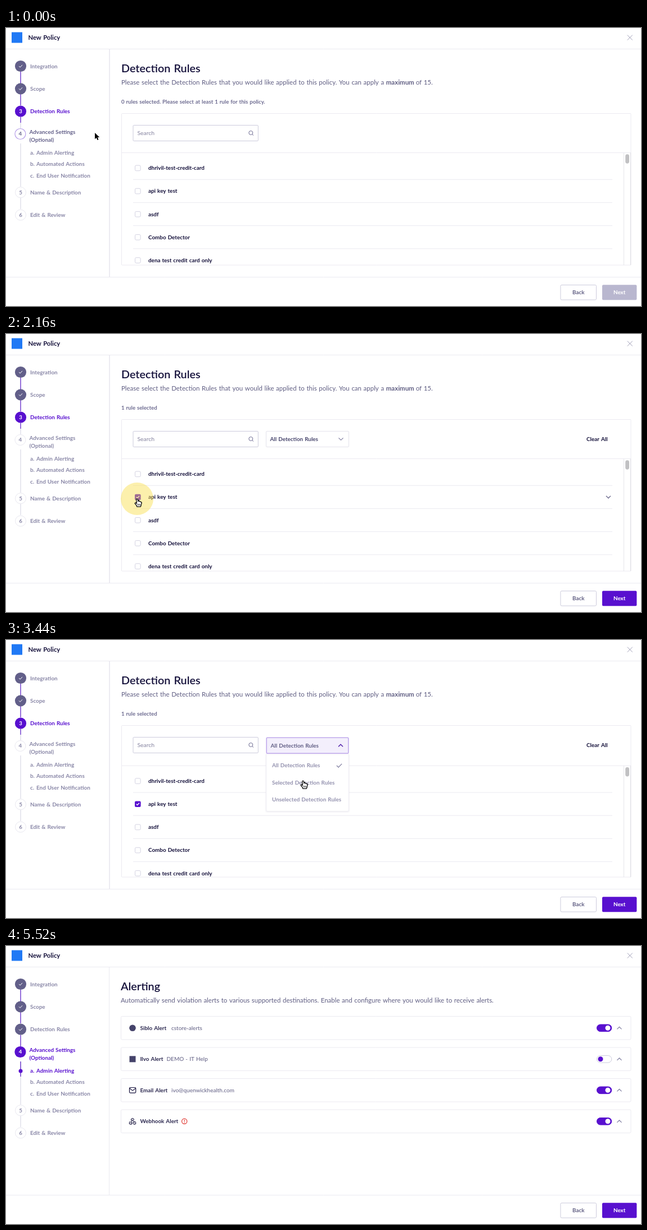
These frames come from a looping animation (1129x496 px, 5.68 s). An HTML page with a canvas:

```html
<!DOCTYPE html>
<html lang="en">
<head>
<meta charset="utf-8">
<title>New Policy</title>
<style>
html, body { margin: 0; width: 100%; height: 100%; overflow: hidden; background: #fff; }
canvas { display: block; width: 1129px; height: 496px; }
</style>
</head>
<body>
<canvas id="stage"></canvas>
<script>
const W = 1129, H = 496, LOOP = 5680, STEP = 80;
const canvas = document.getElementById('stage');
const ctx = canvas.getContext('2d');
const dpr = window.devicePixelRatio || 1;
canvas.width = W * dpr;
canvas.height = H * dpr;

const INK = '#15113b', DARK = '#48466d', MID = '#5f5d82', SOFT = '#8987a7';
const LINE = '#ebeaf1', EDGE = '#cccbdc', PURPLE = '#5810cf';
const BODY = 11.48;

// When things happen, in ms
const SELECT = 2000, OPEN = 2880, FILTER = 3600, SUBMIT = 4960, PAGE = 5120, HIDE = 5280;
const CLICKS = [SELECT, OPEN, FILTER, SUBMIT];

// Pointer stops: time, x, y
const PATH = [
  [0, 158, 187], [1200, 271, 213], [1280, 271, 213], [1680, 233, 294],
  [2240, 233, 294], [2800, 524, 187], [3040, 524, 187], [3440, 528, 251],
  [3680, 528, 251], [4000, 243, 249], [4160, 243, 249], [4720, 1091, 481]
];

const RULES = ['dhrivil-test-credit-card', 'api key test', 'asdf', 'Combo Detector', 'dena test credit card only'];
const ROW = 41.15;

function text(str, x, y, color, size = 9.9, weight = 700, align = 'left') {
  ctx.font = `${weight} ${size}px Lato, sans-serif`;
  ctx.wordSpacing = `${size * 0.06}px`;
  ctx.textAlign = align;
  ctx.fillStyle = color;
  ctx.fillText(str, x, y + size * 0.355);
  return ctx.measureText(str).width;
}

function line(points, color, width = 1) {
  ctx.beginPath();
  points.forEach(([x, y]) => ctx.lineTo(x, y));
  ctx.strokeStyle = color;
  ctx.lineWidth = width;
  ctx.stroke();
}

const hline = (x1, x2, y, color = LINE) => line([[x1, y], [x2, y]], color);
const vline = (x, y1, y2, color = LINE, width = 1) => line([[x, y1], [x, y2]], color, width);

function box(x, y, w, h, fill, edge, radius = 1.5, width = 1) {
  ctx.beginPath();
  ctx.roundRect(x, y, w, h, radius);
  paint(fill, edge, width);
}

function disc(x, y, r, fill, edge, width = 1) {
  ctx.beginPath();
  ctx.arc(x, y, r, 0, Math.PI * 2);
  paint(fill, edge, width);
}

function paint(fill, edge, width) {
  if (fill) { ctx.fillStyle = fill; ctx.fill(); }
  if (edge) { ctx.strokeStyle = edge; ctx.lineWidth = width; ctx.stroke(); }
}

const check = (x, y, s, color, width = 1.2) =>
  line([[x - s, y], [x - s * 0.3, y + s * 0.7], [x + s, y - s * 0.7]], color, width);

const chevron = (x, y, up, color = '#77759a', width = 1.1) => {
  const d = up ? -2 : 2;
  line([[x - 4, y - d], [x, y + d], [x + 4, y - d]], color, width);
};

function pointerAt(t) {
  for (let i = 1; i < PATH.length; i++) {
    const [t0, x0, y0] = PATH[i - 1], [t1, x1, y1] = PATH[i];
    if (t <= t1) {
      const u = (t - t0) / (t1 - t0), e = u * u * (3 - 2 * u);
      return { x: x0 + (x1 - x0) * e, y: y0 + (y1 - y0) * e };
    }
  }
  const [, x, y] = PATH[PATH.length - 1];
  return { x, y };
}

const within = (p, x1, y1, x2, y2) => p.x >= x1 && p.x <= x2 && p.y >= y1 && p.y <= y2;

function drawFrame() {
  box(10, 7.5, 19, 19, '#2079f5', null, 0);
  text('New Policy', 39.5, 17, INK, 11.2);
  line([[1104.8, 12.6], [1113.8, 21.6]], '#a09fb8');
  line([[1113.8, 12.6], [1104.8, 21.6]], '#a09fb8');
  hline(0, W, 37.5);
  hline(0, W, 444.5);
}

function step(n, y, label, state) {
  const x = n === 4 ? 25.4 : 26;
  const hover = state === 'hover';
  if (state === 'done') {
    disc(x, y, 10.1, '#625f89');
    check(x, y, 3, '#fff', 1);
  } else if (state === 'active') {
    disc(x, y, 10.1, PURPLE);
    text(n, x, y, '#fff', 9.5, 700, 'center');
  } else {
    disc(x, y, 9.5, '#fff', hover ? '#b79fe9' : '#e9e8f0', hover ? 1.2 : 1);
    text(n, x, y, hover ? '#6b6990' : SOFT, 9.8, 700, 'center');
  }
  const color = state === 'active' ? PURPLE : hover ? '#64618a' : SOFT;
  if (n === 4) {
    text(label, 41.5, 185.7, color);
    text('(Optional)', 41.5, 199.2, color);
  } else {
    text(label, 43, y, color);
  }
}

function drawSidebar(alerting, hover) {
  const grey = '#dfdee8', violet = '#6a35cc';
  if (alerting) vline(183.5, 38, 444);
  else vline(184, 38, 444, '#ecebf2', 2);
  vline(26, 78, 138, violet, 1.4);
  vline(26, 159, alerting ? 179 : 169, violet, 1.4);
  if (!alerting) vline(26, 169, 179, grey, 1.4);
  vline(26, 206, 283, grey, 1.4);
  vline(26, 303, 323, grey, 1.4);
  step(1, 68, 'Integration', 'done');
  step(2, 108.3, 'Scope', 'done');
  step(3, 148.7, 'Detection Rules', alerting ? 'done' : 'active');
  step(4, 189, 'Advanced Settings', alerting ? 'active' : hover ? 'hover' : 'next');
  step(5, 293.3, 'Name & Description', 'next');
  step(6, 333.6, 'Edit & Review', 'next');
  if (alerting) {
    vline(26, 206, 233, violet, 1.4);
    disc(26, 223, 3.5, PURPLE);
  }
  ['Admin Alerting', 'Automated Actions', 'End User Notification'].forEach((name, i) => {
    const y = 222.7 + i * 20.2, color = alerting && i === 0 ? PURPLE : SOFT;
    text('abc'[i] + '.', 43, y, color);
    text(name, 54, y, color);
  });
}

function drawButtons(fill) {
  box(986, 458.5, 63.5, 26.5, '#fff', EDGE, 2);
  text('Back', 1017.7, 471.5, MID, 9.9, 700, 'center');
  box(1060, 458.3, 61.4, 26.9, fill, null, 2);
  text('Next', 1090.7, 471.5, '#fff', 9.9, 700, 'center');
}

function drawHeading(title, x) {
  text(title, x, 71.5, INK, 19.8, 600);
}

function drawRow(name, y, checked, hover) {
  if (checked) {
    box(229, y - 5.2, 10.6, 10.6, PURPLE, null, 2);
    check(234.3, y, 2.7, '#fff', 1.3);
  } else {
    box(229.5, y - 4.7, 9.6, 9.6, '#fff', '#d3d2e1', 2);
  }
  text(name, 253, y, INK);
  if (hover) chevron(1071, y, false, '#56547c', 1.2);
}

function drawDropdown(open, label) {
  if (!open) {
    box(462.5, 173.5, 147, 28, '#fff', '#e4e3ec');
    text(label, 469.5, 187.3, DARK);
    chevron(595.5, 187.3, false);
    return;
  }
  ctx.save();
  ctx.shadowColor = 'rgba(50,40,90,.07)';
  ctx.shadowBlur = 3;
  ctx.shadowOffsetY = 1;
  box(462.5, 203, 147, 102.5, '#fff', '#efeef4');
  ctx.restore();
  box(463.2, 174.2, 145.6, 28, '#f3effc', '#c0aaec', 1.5, 1.6);
  text(label, 470.5, 188.2, '#625f85');
  chevron(595, 188.2, true, '#4c1ba8', 1.4);
  ['All', 'Selected', 'Unselected'].forEach((kind, i) =>
    text(kind + ' Detection Rules', 473, 223.9 + i * 30.3, '#9492af'));
  check(592.5, 224, 4.6, '#77759a', 1.1);
}

function drawRules(t, p) {
  const selected = t >= SELECT, open = t >= OPEN && t < FILTER, filtered = t >= FILTER;
  const shift = open ? 1.7 : 0, bottom = filtered ? 291.5 : 423;
  const top = 222.5 + shift;

  drawHeading('Detection Rules', 205);
  let x = 205;
  const lead = 'Please select the Detection Rules that you would like applied to this policy. You can apply a ';
  [[lead, 400], ['maximum', 700], [' of 15.', 400]].forEach(([part, weight]) => {
    x += text(part, x, 97, MID, BODY, weight);
  });
  text(selected ? '1 rule selected' : '0 rules selected. Please select at least 1 rule for this policy.',
    205, 131.8, '#6d6b90', 9.65);

  box(205.5, 152.5, 905.5, bottom - 152.5, '#fff', LINE, 1);
  box(226, 173.5, 222.3, 28, '#fff', EDGE);
  text('Search', 233.5, 187.6, '#84829f', 10.4, 400);
  disc(435.3, 187, 3.5, null, '#6d6b92');
  line([[437.8, 189.5], [440, 191.7]], '#6d6b92');
  if (selected) text('Clear All', 1032, 187.3, INK);
  hline(206, 1111, top);

  const rows = filtered ? [RULES[1]] : RULES;
  const inList = !open && p.x > 206 && p.x < 1098;
  const over = inList ? Math.floor((p.y - 229) / ROW) : -1;
  ctx.save();
  ctx.beginPath();
  ctx.rect(206, top, 905, bottom - top - 0.5);
  ctx.clip();
  rows.forEach((name, i) => {
    const y = 249.8 + shift + i * ROW;
    drawRow(name, y, selected && name === RULES[1], over === i);
    if (!filtered) hline(226, 1078, y + 20.5);
  });
  ctx.restore();
  vline(1098.5, top, bottom, '#e6e6ea');
  vline(1110.5, top, bottom, '#dedee4');
  if (!filtered) box(1101.2, 225.3 + shift, 6.8, 16.4, '#c1c1c3', null, 3.4);

  if (selected) drawDropdown(open, (filtered ? 'Selected' : 'All') + ' Detection Rules');
}

function toggle(y, on) {
  box(1050.5, y - 6.3, 26.3, 12.6, on ? PURPLE : '#fff', on ? PURPLE : EDGE, 6.3);
  disc(on ? 1070 : 1057, y, 4.5, on ? '#fff' : PURPLE);
}

function envelope(y) {
  box(219.5, y - 4.8, 11.2, 9.6, null, INK, 1.5, 1.2);
  line([[219.7, y - 3.5], [225.1, y + 0.8], [230.5, y - 3.5]], INK, 1.2);
}

function hook(y) {
  for (let i = 0; i < 3; i++) {
    ctx.save();
    ctx.translate(225, y + 1);
    ctx.rotate(i * Math.PI * 2 / 3);
    ctx.beginPath();
    ctx.arc(0, -3.8, 2.4, Math.PI * 0.75, Math.PI * 2.1);
    ctx.moveTo(0, -3.8);
    ctx.lineTo(2.9, 1.2);
    ctx.strokeStyle = INK;
    ctx.lineWidth = 1.05;
    ctx.stroke();
    ctx.restore();
  }
}

function drawAlerting() {
  drawHeading('Alerting', 204);
  text('Automatically send violation alerts to various supported destinations. Enable and configure where you would like to receive alerts.',
    204, 97, MID, BODY, 400);
  const cards = [
    ['Siblo Alert', 'cstore-alerts', 294, true],
    ['Ilvo Alert', 'DEMO - IT Help', 285.5, false],
    ['Email Alert', 'ivo@quenwickhealth.com', 294, true],
    ['Webhook Alert', '', 0, true]
  ];
  cards.forEach(([name, detail, x, on], i) => {
    const y = 146.3 + i * 55.5;
    box(204.5, y - 20.8, 906.5, 41.5, '#fff', LINE, 2);
    text(name, 238.5, y, '#2c2950');
    if (detail) text(detail, x, y, MID, 10, 400);
    toggle(y, on);
    chevron(1090.5, y, true);
  });
  disc(225, 146.3, 5.8, '#45436a');
  box(219.5, 196.3, 11, 11, '#45436a', null, 0);
  envelope(257.3);
  hook(312.8);
  disc(317.2, 312.8, 4.6, null, '#e0352f', 1.2);
  vline(317.2, 310.3, 313.3, '#e0352f', 1.2);
  disc(317.2, 315, 0.7, '#e0352f');
}

function drawRipple(t) {
  CLICKS.forEach(start => {
    const age = t - start;
    if (age < 0 || age >= 320) return;
    const p = pointerAt(start);
    ctx.globalAlpha = 0.85 - age * 0.0025;
    disc(p.x, p.y, 18 + age * 0.069, '#f8de48');
    ctx.globalAlpha = 1;
  });
}

function drawPointer(p, hand) {
  ctx.save();
  ctx.translate(p.x, p.y);
  ctx.lineJoin = 'round';
  const shape = new Path2D(hand
    ? 'M-1.3 1.2Q0-.8 1.3 1.2L1.8 5Q3-.0 4 5Q5.6 4 6.3 5.8Q8 5.4 8 7.4L7.4 10.6L6.3 14H-.2L-1 11.6L-3.7 8.4Q-3.8 6.4-1.6 7.6L-.5 8.6Z'
    : 'M0 0V11.2L2.6 8.8L4.5 13L6.5 12.1L4.7 8.1H8.2Z');
  ctx.lineWidth = hand ? 1.1 : 1.5;
  ctx.strokeStyle = hand ? '#000' : '#fff';
  ctx.fillStyle = hand ? '#fff' : '#000';
  ctx.stroke(shape);
  ctx.fill(shape);
  if (hand) {
    ctx.stroke(shape);
    [1.3, 3.3, 5.3].forEach(x => vline(x, 9, 12, '#000', 0.8));
  }
  ctx.restore();
}

function render(now) {
  const t = Math.floor((now % LOOP) / STEP) * STEP;
  const p = pointerAt(t), alerting = t >= PAGE;
  const selected = t >= SELECT, open = t >= OPEN && t < FILTER;
  const overNext = within(p, 1060, 458, 1121, 485) && t < HIDE;
  const overBox = within(p, 228, 229, 241, 423) && Math.abs((p.y - 249.7) % ROW) < 7;
  const overMenu = selected && within(p, 462, 173, 609, open ? 305 : 202);
  const overBack = within(p, 986, 458, 1050, 485);

  ctx.setTransform(dpr, 0, 0, dpr, 0, 0);
  ctx.fillStyle = '#fff';
  ctx.fillRect(0, 0, W, H);
  drawFrame();
  drawSidebar(alerting, within(p, 0, 170, 183, 207));
  if (alerting) drawAlerting();
  else drawRules(t, p);
  drawButtons(!selected ? '#b9b7cf' : overNext ? '#37009f' : PURPLE);
  if (t < HIDE) {
    drawRipple(t);
    drawPointer(p, overNext || overBox || overMenu || overBack);
  }
}

const begin = performance.now();
function tick() {
  render(performance.now() - begin);
  requestAnimationFrame(tick);
}
tick();
</script>
</body>
</html>
```
